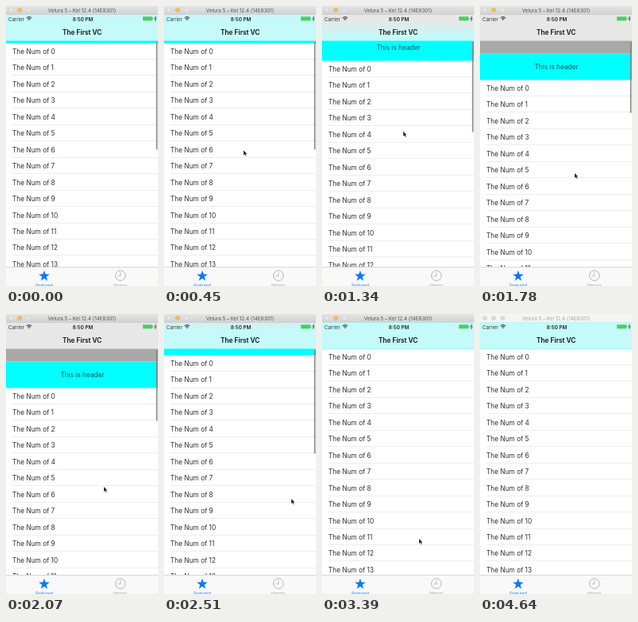
Animation of 191 by 350 pixels, one loop 4.74 s. Source, as an HTML page with a canvas:

```html
<!DOCTYPE html>
<html lang="en">
<head>
<meta charset="utf-8">
<style>
  html, body { margin: 0; width: 100%; height: 100%; overflow: hidden; background: #fff; }
  canvas { display: block; width: 191px; height: 350px; }
</style>
</head>
<body>
<canvas id="stage" width="191" height="350"></canvas>
<script>
const ctx = document.getElementById('stage').getContext('2d');
const W = 191, H = 350, LOOP = 4740, TICK = 147.5;
const BAR_TOP = 10.5, NAV_BOTTOM = 43.5, TAB_TOP = 326, ROW = 20.46, HEADER = 33;
const FONT = 'Inter, "Liberation Sans", sans-serif';
const BLUE = '#0a78fb';

const clamp = v => Math.max(0, Math.min(1, v));
const lerp = (a, b, p) => a + (b - a) * p;

// Times of the gesture, counted in screen refreshes.
const ENTER = 0, READY = 4, GRAB = 6, STRETCHED = 12, HOLD = 14, RELEASE = 15;
const ASIDE = 17, SETTLED = 19, REST = 23, GONE = 28;
const ramp = (tick, from, to) => clamp((tick - from) / (to - from));

const pull = tick => ramp(tick, GRAB, STRETCHED) ** 1.25;

// The list resists the drag like a rubber band, then springs back.
function listTop(tick) {
  const stretch = 3 + 46 * pull(tick) ** 0.85;
  return NAV_BOTTOM + stretch * (1 - ramp(tick, RELEASE, SETTLED)) ** 2.6;
}

function cursorAt(tick) {
  const away = 1 - ramp(tick, ENTER, READY);
  const drag = pull(tick);
  const drift = ramp(tick, STRETCHED, HOLD);
  const aside = ramp(tick, RELEASE, ASIDE);
  const back = ramp(tick, ASIDE, REST);
  const leave = ramp(tick, REST, GONE);
  return {
    x: 90 + 40 * away + 29 * drag + 4 * drift + 37 * aside - 38 * back - 12 * leave,
    y: 119 + 246 * away + 90 * drag + 7 * drift + 15 * aside + 50 * back + 71 * leave
  };
}

function rect(x, y, w, h, color) {
  ctx.fillStyle = color;
  ctx.fillRect(x, y, w, h);
}

function text(str, x, y, size, color, align = 'left', weight = 400) {
  ctx.font = `${weight} ${size}px ${FONT}`;
  ctx.textAlign = align;
  ctx.fillStyle = color;
  ctx.fillText(str, x, y);
}

function arc(x, y, r, color, width, from = 0, to = Math.PI * 2) {
  ctx.beginPath();
  ctx.arc(x, y, r, from, to);
  ctx.strokeStyle = color;
  ctx.lineWidth = width;
  ctx.stroke();
}

function dot(x, y, r, color) {
  ctx.beginPath();
  ctx.arc(x, y, r, 0, Math.PI * 2);
  ctx.fillStyle = color;
  ctx.fill();
}

function drawList(top) {
  rect(0, 0, W, H, '#fff');
  rect(0, 0, W, top - HEADER, '#a9a9a9');
  rect(0, top - HEADER, W, HEADER, '#00ffff');
  text('This is header', 96, top - 13.3, 8.3, '#155', 'center');
  for (let i = 0; top + i * ROW < H; i++) {
    const y = top + i * ROW;
    text(`The Num of ${i}`, 8, y + 13.4, 8.3, '#2c2c2c');
    rect(8, Math.round(y + ROW) - 1, W - 8, 1, '#ededed');
  }
}

function drawScrollBar(top, alpha) {
  ctx.globalAlpha = alpha;
  rect(188.7, 45, 1.6, 181 - top, '#858585');
  ctx.globalAlpha = 1;
}

// The bar shows a blurred tint of the header passing beneath it.
function drawNavBar(top) {
  const bar = ctx.createLinearGradient(0, BAR_TOP, 0, NAV_BOTTOM);
  for (let s = 0; s <= 1; s += 0.125) {
    const y = lerp(BAR_TOP, NAV_BOTTOM, s);
    const tint = clamp((y - (top - HEADER) + 17) / 20);
    const red = lerp(231, 196, tint), rest = lerp(231, 250, tint);
    bar.addColorStop(s, `rgb(${red},${rest},${rest})`);
  }
  rect(0, BAR_TOP, W, NAV_BOTTOM - BAR_TOP, bar);
  text('The First VC', 95.7, 35.5, 8.3, '#111', 'center', 600);
}

function drawStatus() {
  text('Carrier', 3, 18.5, 6.1, '#333');
  for (let r = 1.3; r < 5; r += 1.7) arc(29, 18.3, r, '#333', 1, -Math.PI * 0.75, -Math.PI * 0.25);
  text('8:50 PM', 96.5, 18.5, 6.3, '#222', 'center', 600);
  rect(172, 13.3, 12, 5, '#43d45c');
  rect(184.6, 14.8, 0.8, 2, '#43b85a');
  ctx.beginPath();
  ctx.moveTo(188.4, 12.8);
  ctx.lineTo(186.8, 16.2);
  ctx.lineTo(188.8, 15.6);
  ctx.lineTo(187.4, 18.8);
  ctx.strokeStyle = '#333';
  ctx.lineWidth = 0.8;
  ctx.stroke();
}

function drawStar(x, y, radius) {
  ctx.beginPath();
  for (let i = 0; i < 10; i++) {
    const r = i % 2 ? radius * 0.39 : radius, a = (i / 5 - 0.5) * Math.PI;
    ctx.lineTo(x + r * Math.cos(a), y + r * Math.sin(a));
  }
  ctx.fillStyle = BLUE;
  ctx.fill();
}

function drawTabBar() {
  rect(0, TAB_TOP, W, H - TAB_TOP, '#f9f9f9');
  rect(0, TAB_TOP, W, 0.6, '#c4c4c4');
  drawStar(48, 337.6, 7.2);
  text('Featured', 48, 350.6, 5.2, BLUE, 'center');
  arc(143.8, 337, 6.3, '#a4a4a4', 0.8);
  rect(143.5, 333, 0.7, 4.5, '#a4a4a4');
  rect(140.5, 336.9, 3.5, 0.7, '#a4a4a4');
  text('History', 143.7, 350.6, 5.2, '#a0a0a0', 'center');
}

function drawWindowBar(active) {
  const bar = ctx.createLinearGradient(0, 0, 0, BAR_TOP);
  bar.addColorStop(0, active ? '#e4e4e4' : '#f6f6f6');
  bar.addColorStop(1, active ? '#d2d2d2' : '#f4f4f4');
  rect(0, 0, W, BAR_TOP, bar);
  for (let i = 0; i < 3; i++) {
    const x = 6 + 11.2 * i, lit = active && i === 1;
    dot(x, 5, 2.7, lit ? '#f5bd62' : active ? '#e8e6e4' : '#dcdcdc');
    arc(x, 5, 2.7, lit ? '#e0ac58' : '#cacaca', 0.5);
  }
  text('Velura 5 – Kel 12.4 (14E8301)', 95.5, 7.9, 6.3, active ? '#555' : '#a8a8a8', 'center');
}

function drawCursor({ x, y }) {
  ctx.beginPath();
  ctx.moveTo(x, y);
  ctx.lineTo(x, y + 6);
  ctx.lineTo(x + 1.6, y + 4.8);
  ctx.lineTo(x + 2.8, y + 7.2);
  ctx.lineTo(x + 3.5, y + 6.8);
  ctx.lineTo(x + 2.5, y + 4.5);
  ctx.lineTo(x + 4.2, y + 4.3);
  ctx.closePath();
  ctx.strokeStyle = '#fff';
  ctx.lineWidth = 1;
  ctx.stroke();
  ctx.fillStyle = '#222';
  ctx.fill();
}

function draw(now) {
  const time = now % LOOP;
  const tick = Math.floor((time + 4) / TICK);
  const top = listTop(tick);
  drawList(top);
  drawScrollBar(top, 1 - ramp(tick, SETTLED + 1, REST - 1));
  drawNavBar(top);
  drawStatus();
  drawTabBar();
  drawWindowBar(time < 4640);
  drawCursor(cursorAt(tick));
}

const start = performance.now();
function loop() {
  draw(performance.now() - start);
  requestAnimationFrame(loop);
}
loop();
</script>
</body>
</html>
```
